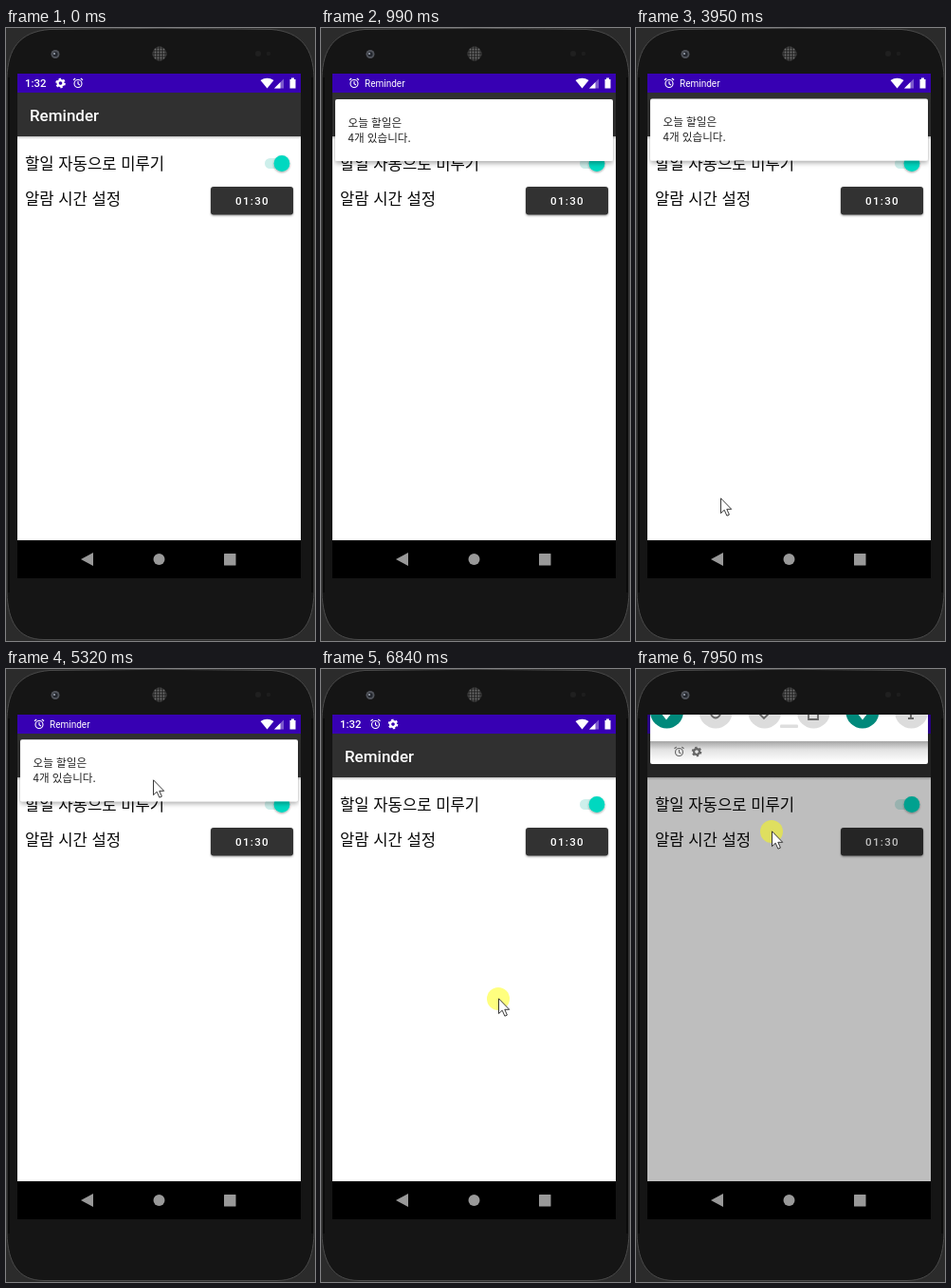
These frames come from a looping animation (326x645 px, 8 s). An HTML page:

```html
<!DOCTYPE html>
<html lang="ko">
<head>
<meta charset="utf-8">
<title>Reminder</title>
<style>
  html, body { margin: 0; width: 100%; height: 100%; overflow: hidden; background: #2b2b2b; }
  svg { display: block; width: 326px; height: 645px; }
  text { font-family: Roboto, "Noto Sans CJK KR", "Noto Sans CJK", sans-serif; white-space: pre; }
  .ko { font-family: "Noto Sans CJK KR", "Noto Sans CJK", "Noto Sans CJK JP", sans-serif; }
  .row { font-size: 16.65px; fill: #080808; }
  .note { font-size: 11.6px; fill: #222; }
  .white { fill: #fff; color: #fff; }
  .medium { font-weight: 500; }
</style>
</head>
<body>
<svg viewBox="0 0 326 645">
  <defs>
    <symbol id="gear" viewBox="-6 -6 12 12">
      <circle r="4.3" fill="none" stroke="currentColor" stroke-width="2" stroke-dasharray="2.3 2.2"/>
      <circle r="2.9" fill="none" stroke="currentColor" stroke-width="2.2"/>
    </symbol>
    <symbol id="alarm" viewBox="-6 -6 12 12">
      <g fill="none" stroke="currentColor" stroke-width="1.1">
        <circle cy=".5" r="4"/>
        <path d="M0-2V.8L1.9 2M-5-3.2L-2.8-5M5-3.2L2.8-5"/>
      </g>
    </symbol>
    <pattern id="mesh" width="3" height="3" patternUnits="userSpaceOnUse">
      <rect width="3" height="3" fill="#2c2c2c"/>
      <circle cx="1.5" cy="1.5" r=".9" fill="#707070"/>
    </pattern>
    <linearGradient id="fade" x2="0" y2="1">
      <stop stop-color="#a4a4a4"/><stop offset=".4" stop-color="#e2e2e2"/><stop offset="1" stop-color="#fff"/>
    </linearGradient>
    <linearGradient id="edge" x2="0" y2="1">
      <stop stop-color="#c4c4c4"/><stop offset="1" stop-color="#fff"/>
    </linearGradient>
    <filter id="lift" x="-10%" y="-30%" width="120%" height="160%">
      <feDropShadow dx="0" dy="2.5" stdDeviation="2.5" flood-opacity=".32"/>
    </filter>
    <filter id="low" x="-10%" y="-30%" width="120%" height="160%">
      <feDropShadow dx="0" dy="1" stdDeviation=".9" flood-opacity=".4"/>
    </filter>
    <clipPath id="screen"><rect x="12" y="48" width="299" height="491"/></clipPath>
  </defs>

  <!-- phone body -->
  <path d="M1 52C2 22 14 4 46 1.5Q163-1 280 1.5C312 4 324 22 325 52V594C324 624 314 643.5 286 643.5H40C12 643.5 2 624 1 594Z" fill="#151515" stroke="#4a4a4a"/>
  <path d="M3 52V594M323 52V594" stroke="#0b0b0b" stroke-width="2"/>
  <circle cx="52" cy="27.5" r="4.5" fill="#50535a"/>
  <circle cx="52" cy="27.5" r="2.6" fill="#24272e"/>
  <circle cx="51" cy="27" r="1" fill="#a5adb8"/>
  <circle cx="162" cy="27" r="7.5" fill="url(#mesh)"/>
  <circle cx="266" cy="27" r="3" fill="#202020"/>
  <circle cx="277" cy="27" r="2.3" fill="#1d1d1d"/>

  <!-- app -->
  <rect x="12" y="48" width="299" height="531" fill="#fff"/>
  <rect x="12" y="114" width="299" height="3" fill="url(#edge)"/>
  <rect x="12" y="68" width="299" height="46" fill="#303030"/>
  <text class="white medium" x="25" y="97.5" font-size="17">Reminder</text>
  <text class="ko row" x="20" y="148.5">할일 자동으로 미루기</text>
  <text class="ko row" x="20" y="185.5">알람 시간 설정</text>
  <rect x="273" y="137" width="26" height="11" rx="5.5" fill="#cdefeb"/>
  <circle cx="291" cy="142.5" r="8.4" fill="#04d8c0" filter="url(#low)"/>
  <rect x="216" y="167" width="87" height="29.5" rx="3" fill="#303030" filter="url(#low)"/>
  <text class="white medium" x="242" y="186" font-size="11.6" letter-spacing="1.3">01:30</text>

  <!-- status bar -->
  <rect x="12" y="48" width="299" height="20" fill="#3700b3"/>
  <g class="white">
    <g id="idle">
      <text class="medium" x="20" y="62" font-size="11.4">1:32</text>
      <use id="gearIcon" href="#gear" y="52" width="12" height="12"/>
      <use id="alarmIcon" href="#alarm" y="52" width="12" height="12"/>
    </g>
    <g id="ticker">
      <use href="#alarm" x="29" y="52" width="12" height="12"/>
      <text x="46" y="62" font-size="10">Reminder</text>
    </g>
    <path d="M268.5 55Q275.500 50.500 282.500 55L275.500 63.500Z"/>
    <path d="M283 63.500L293 53.500V63.500Z" opacity=".35"/>
    <path d="M283 63.500L289.500 57V63.500Z"/>
    <path d="M299.500 54H301V52.500H304V54H305.500V63.500H299.500Z"/>
  </g>

  <!-- heads-up card -->
  <g id="card">
    <rect x="15" width="293" height="65" rx="2" fill="#fff" filter="url(#lift)"/>
    <text class="ko note" x="28.500" y="28.500">오늘 할일은</text>
    <text class="ko note" x="28.500" y="45">4개 있습니다.</text>
  </g>

  <!-- notification shade -->
  <g id="shade" clip-path="url(#screen)">
    <rect x="12" y="48" width="299" height="491" opacity=".255"/>
    <rect x="15" y="40" width="293" height="60" rx="2" fill="#fff"/>
    <rect x="15" y="76" width="293" height="22" fill="url(#fade)"/>
    <g id="tiles"></g>
    <rect x="152" y="58.500" width="19" height="3.500" rx="1" fill="#dedede"/>
    <g fill="none" stroke="#666" stroke-width="1.800">
      <path d="M79 48Q84 55 89 48M130 47L135 52L141 46M182 44V53H192V44M287 52H293M290 44V52"/>
      <path d="M28 46L32 51L36 46M235 46L239 51L243 46" stroke="#fff" stroke-width="3"/>
    </g>
    <g color="#666">
      <use href="#alarm" x="39.500" y="81" width="12" height="12"/>
      <use href="#gear" x="58" y="81" width="12" height="12"/>
    </g>
  </g>

  <!-- navigation bar -->
  <rect x="12" y="539" width="299" height="40"/>
  <g fill="#999">
    <path d="M79 559L92 552V566Z"/>
    <circle cx="161.500" cy="559" r="6"/>
    <rect x="230" y="553" width="12.500" height="12.500" rx=".5"/>
  </g>

  <g id="pointer">
    <circle id="press" cy="1" r="12" fill="#ff0" opacity=".5"/>
    <path d="M.5.8V16.600L4.200 13.200L6.900 19.200L9.400 18.100L6.800 12.300H11.700Z" fill="#fff" stroke="#222" stroke-width=".9"/>
  </g>
</svg>
<script>
  const LOOP = 8000, STEP = 70;
  const $ = id => document.getElementById(id);

  const bursts = [[500, 990], [2510, 2720], [3400, 3680], [3880, 4020], [4220, 4920],
    [5320, 5320], [5580, 6350], [6420, 7190], [7260, 7470], [7670, 7950]];

  // time, x, y
  const pointerPath = [
    [2510, 126, 607], [2580, 141, 578], [2650, 145, 548], [2720, 134, 527],
    [3400, 129, 524], [3680, 93, 501], [3880, 91, 497], [4020, 86, 490],
    [4220, 92, 474], [4500, 240, 270], [4570, 247, 226], [4710, 212, 150], [4920, 155, 117],
    [5320, 155, 116], [5580, 145, 145], [5720, 84, 290], [5930, 130, 500],
    [6070, 190, 557], [6210, 241, 510], [6350, 203, 441],
    [6420, 200, 430], [6840, 187, 346], [7190, 186, 177],
    [7260, 176, 148], [7470, 138, 53],
    [7670, 139, 60], [7740, 139, 75], [7810, 141, 105], [7880, 143, 142], [7950, 143, 170]
  ];

  // time, top, opacity
  const cardPath = [
    [500, 55, .3], [570, 66, .8], [640, 75, 1], [710, 78, 1], [850, 77, 1], [990, 75, 1],
    [6420, 74, 1], [6560, 60, .4], [6630, 54, 0]
  ];

  function sample(path, t) {
    const i = path.findIndex(p => p[0] > t);
    if (i < 0) return path[path.length - 1].slice(1);
    if (i === 0) return path[0].slice(1);
    const a = path[i - 1], b = path[i], k = (t - a[0]) / (b[0] - a[0]);
    return [1, 2].map(n => a[n] + (b[n] - a[n]) * k);
  }

  function hold(t) {
    let held = 0;
    for (const [from, to] of bursts) {
      if (t >= from) held = Math.min(to, from + Math.floor((t - from) / STEP) * STEP);
    }
    return held;
  }

  const show = (id, on) => $(id).style.display = on ? "" : "none";
  const within = (t, from, to) => t >= from && t < to;

  $("tiles").innerHTML = Array.from({ length: 6 }, (_, i) =>
    `<circle cx="${32.500 + i * 51.600}" cy="45" r="17.500" fill="${i % 4 ? "#dcdcdc" : "#00897b"}"/>`).join("");

  function draw(now) {
    const t = hold(now % LOOP);
    const heads = within(t, 500, 6560);
    show("ticker", heads);
    show("idle", !heads);
    $("gearIcon").setAttribute("x", t < 500 ? 51.500 : 70);
    $("alarmIcon").setAttribute("x", t < 500 ? 70 : 51.500);

    const [top, alpha] = sample(cardPath, t);
    show("card", within(t, 500, 6630));
    $("card").setAttribute("transform", `translate(0 ${top})`);
    $("card").setAttribute("opacity", alpha);

    const [x, y] = sample(pointerPath, t).map(Math.round);
    show("pointer", t >= 2510);
    $("pointer").setAttribute("transform", `translate(${x} ${y})`);
    show("press", within(t, 6630, 6980) || t >= 7670);
    show("shade", t >= 7950);
  }

  const start = performance.now();
  function tick() {
    draw(performance.now() - start);
    requestAnimationFrame(tick);
  }
  tick();
</script>
</body>
</html>
```
